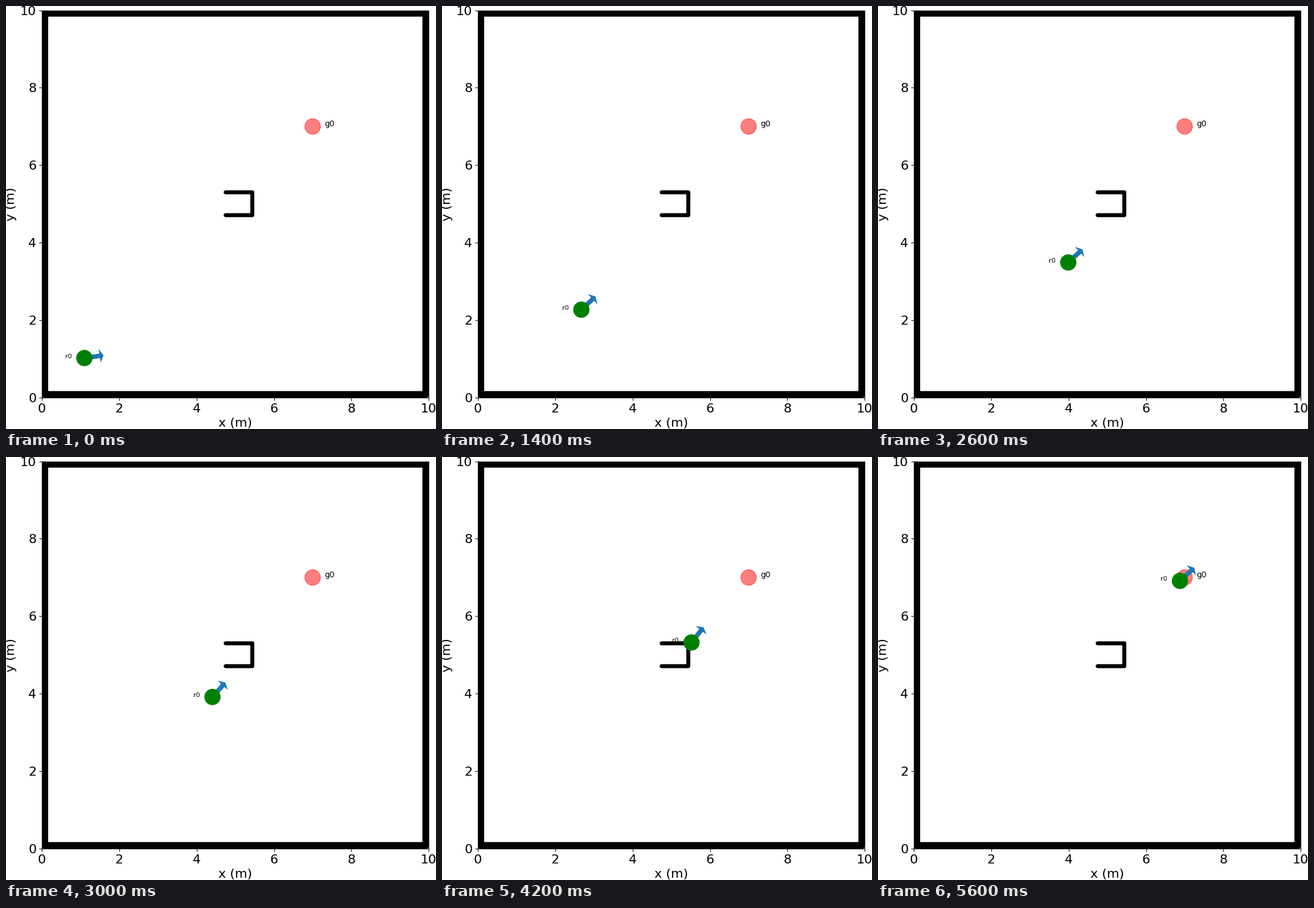
Animation of 755 by 742 pixels, one loop 8700 ms. Source, as a matplotlib script:

```python
import numpy as np
import matplotlib.pyplot as plt
from matplotlib.animation import FuncAnimation
from matplotlib.patches import Circle, Polygon

W, H, DPI = 755, 742, 100
LEFT, BOTTOM, SIDE = 63.0, 686.8, 679.2
FRAMES, STEP_MS, ARRIVE = 87, 100, 56
START, SPEED = (1.098, 1.02), 0.1495  # metres, metres per step
CRUISE, DETOUR = 42.8, 51.8           # headings in degrees


def drive():
    """Turn to cruise, swing wide of the obstacle, then turn back."""
    k = np.arange(ARRIVE + 1)
    angle = np.radians(np.interp(k, [0, 5, 27, 32, 50, 56],
                                 [8, CRUISE, CRUISE, DETOUR, DETOUR, CRUISE]))
    speed = SPEED * np.minimum(1, 0.75 + 0.06 * k)
    moves = speed[:, None] * np.column_stack([np.cos(angle), np.sin(angle)])
    moves[0] = START
    return np.cumsum(moves, axis=0), angle


def arrow_points(pos, angle, length=0.5, width=0.6):
    half = np.array([(0, .1), (.8, .1), (.8, .3), (1, 0)])
    shape = np.vstack([half, half[-2::-1] * (1, -1)]) * (length, width)
    c, s = np.cos(angle), np.sin(angle)
    return pos + shape @ np.array([(c, s), (-s, c)])


def wall(points, px, closed=False):
    if closed:
        points = points + points[:2]
    x, y = zip(*points)
    ax.plot(x, y, color="k", lw=px * 72 / DPI, zorder=1, snap=False,
            solid_capstyle="round", solid_joinstyle="round")


fig = plt.figure(figsize=(W / DPI, H / DPI), dpi=DPI, facecolor="w")
ax = fig.add_axes([LEFT / W, 1 - BOTTOM / H, SIDE / W, SIDE / H])
ax.set(xlim=(0, 10), ylim=(0, 10))
ax.set_xticks(range(0, 11, 2))
ax.set_yticks(range(0, 11, 2))
ax.tick_params(labelsize=16)
ax.set_xlabel("x (m)", fontsize=16)
ax.set_ylabel("y (m)", fontsize=16)

for d in (0.055, 0.109):
    e = 10 - d
    wall([(d, d), (e, d), (e, e), (d, e)], 7.3, closed=True)
wall([(4.75, 5.3), (5.44, 5.3), (5.44, 4.71), (4.75, 4.71)], 7)

ax.add_patch(Circle((7, 7), 0.2, color="r", alpha=0.5, zorder=2))
ax.text(7.3, 7, "g0", fontsize=10, zorder=5)

path, angles = drive()
arrow = ax.add_patch(Polygon(arrow_points(path[0], angles[0]),
                             fc="C0", ec="none", zorder=3))
robot = ax.add_patch(Circle(path[0], 0.2, color="g", zorder=4))
label = ax.text(0, 0, "r0", fontsize=8, zorder=5)


def update(frame):
    k = min(frame, ARRIVE)
    x, y = path[k]
    robot.center = x, y
    arrow.set_xy(arrow_points(path[k], angles[k]))
    label.set_position((x - 0.5, y))
    return arrow, robot, label


anim = FuncAnimation(fig, update, frames=FRAMES, interval=STEP_MS,
                     repeat=True, repeat_delay=0)
plt.show()
```
